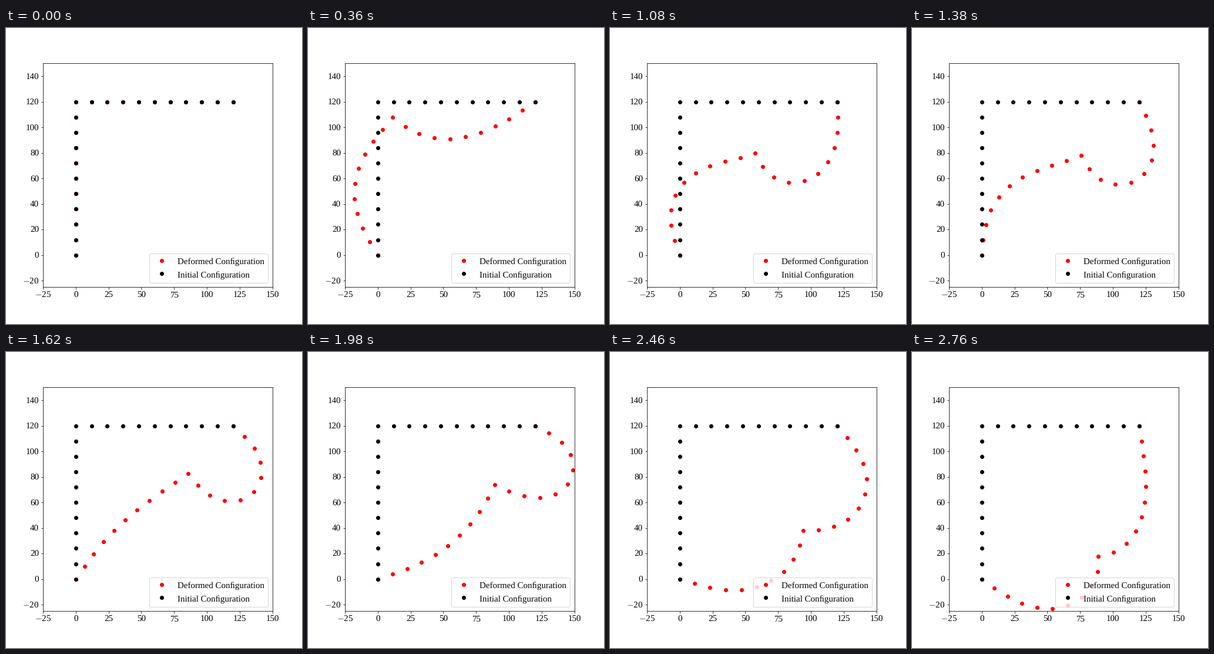
A matplotlib script for the animation above (2.82 s loop, 504 px wide and 504 px high).

```python
import numpy as np
import matplotlib.pyplot as plt
from matplotlib.animation import FuncAnimation

plt.rcParams.update({
    "font.family": "Liberation Serif",
    "font.size": 15,
    "text.hinting": "none",
    "mathtext.fontset": "cm",
})

FRAMES, INTERVAL = 47, 60

# Pinned right-angled frame of straight elements, loaded on its beam
SIDE, N = 120.0, 20
H = 2 * SIDE / N
EI, EA = 1440.0, 4320.0
J = N + 1
LOADED = (np.arange(N) < 12).astype(float)
REST = np.where(np.arange(N) < N // 2, np.pi / 2, 0.0)
MEAN = (np.eye(N, J) + np.eye(N, J, k=1)) / 2
DIFF = np.eye(N, J, k=1) - np.eye(N, J)
BEND = EI / H * DIFF.T @ DIFF
METRIC = np.r_[np.ones(J), np.full(3, 0.0025)]


def shape(z):
    """Element directions, axial force, shear force and stretch."""
    angle = MEAN @ z[:J] + REST
    c, s = np.cos(angle), np.sin(angle)
    a, b = z[J], z[J + 1] + z[J + 2] * LOADED
    force = a * c + b * s
    return c, s, force, b * c - a * s, 1 - force / EA


def equilibrium(z):
    """Residual and Jacobian for rotations, two reactions and the load."""
    c, s, force, shear, stretch = shape(z)
    along = np.column_stack([c, s, s * LOADED])
    across = np.column_stack([-s, c, c * LOADED])
    res = np.r_[BEND @ z[:J] + MEAN.T @ (H * shear * stretch),
                H * np.sum(c * stretch) - SIDE,
                H * np.sum(s * stretch) - SIDE]
    curve = -H * (force * stretch + shear ** 2 / EA)
    stiff = BEND + MEAN.T @ (curve[:, None] * MEAN)
    mix = H * MEAN.T @ (across * stretch[:, None]
                        - along * shear[:, None] / EA)
    soft = -H / EA * along.T @ along
    jac = np.block([[stiff, mix], [mix[:, :2].T, soft[:2]]])
    return res, jac


def nodes(z):
    c, s, _, _, stretch = shape(z)
    steps = H * np.column_stack([c * stretch, s * stretch])
    return np.vstack([[0, 0], np.cumsum(steps, axis=0)])


def trace(length, ds=0.03, limit=3000):
    """Follow the equilibrium path by arc-length continuation."""
    z = np.zeros(J + 3)
    row = np.r_[np.zeros(J + 2), 1.0]
    unit = row.copy()
    path, reach = [nodes(z)], [0.0]
    while reach[-1] < length and len(path) < limit:
        t = np.linalg.solve(np.vstack([equilibrium(z)[1], row]), unit)
        t /= np.sqrt(t @ (METRIC * t))
        row = METRIC * t
        guess = z + ds * t
        z = guess.copy()
        for _ in range(4):
            res, jac = equilibrium(z)
            rhs = np.r_[res, row @ (z - guess)]
            z = z - np.linalg.solve(np.vstack([jac, row]), rhs)
        path.append(nodes(z))
        reach.append(reach[-1] + np.linalg.norm(path[-1] - path[-2]))
    return np.array(path), np.array(reach)


# Pacing: frame -> column middle, corner and beam middle
POSES = {
    12: [(-14.2, 54.7), (33.3, 89.6), (84.3, 73.1)],
    18: [(3.2, 57.0), (57.4, 80.0), (105.4, 63.9)],
    27: [(37.7, 46.8), (85.7, 82.7), (135.8, 68.5)],
    33: [(53.9, 26.1), (89.2, 74.0), (144.4, 74.4)],
    41: [(58.8, -6.0), (93.7, 38.1), (141.2, 66.6)],
    46: [(53.9, -23.1), (88.8, 17.9), (124.2, 60.2)],
}

path, reach = trace(760)


def dots_at(dist):
    """Dot positions after each travelled distance."""
    pos = np.interp(dist, reach, np.arange(len(reach)))
    i = np.minimum(pos.astype(int), len(path) - 2)
    blend = (pos - i)[:, None, None]
    return path[i] + blend * (path[i + 1] - path[i])


grid = np.linspace(0, reach[-1], 6000)
middles = dots_at(grid)[:, [5, 10, 15]]
marks = [0.0]
for pose in POSES.values():
    gap = np.sum((middles - np.array(pose)) ** 2, axis=(1, 2))
    marks.append(grid[np.argmin(gap)])
motion = dots_at(np.interp(np.arange(FRAMES), [0, *POSES], marks))


def tick_label(v):
    return rf"$-\mathregular{{{-v}}}$" if v < 0 else str(v)


fig, ax = plt.subplots(figsize=(7, 7), dpi=72)
fig.subplots_adjust(left=0.125, right=0.9, bottom=0.125, top=0.88)
deformed, = ax.plot([], [], "o", color="red",
                    label="Deformed Con\ufb01guration")
ax.plot(*path[0].T, "o", color="black", label="Initial Con\ufb01guration")
ax.set(xlim=(-25, 150), ylim=(-25, 150))
xticks, yticks = range(-25, 151, 25), range(-20, 141, 20)
ax.set_xticks(xticks, [tick_label(v) for v in xticks])
ax.set_yticks(yticks, [tick_label(v) for v in yticks])
ax.legend(loc="lower right", handleheight=1.0)


def update(frame):
    deformed.set_data(*motion[frame].T)
    return deformed,


anim = FuncAnimation(fig, update, frames=FRAMES, interval=INTERVAL,
                     repeat=True, repeat_delay=0)
plt.show()
```
